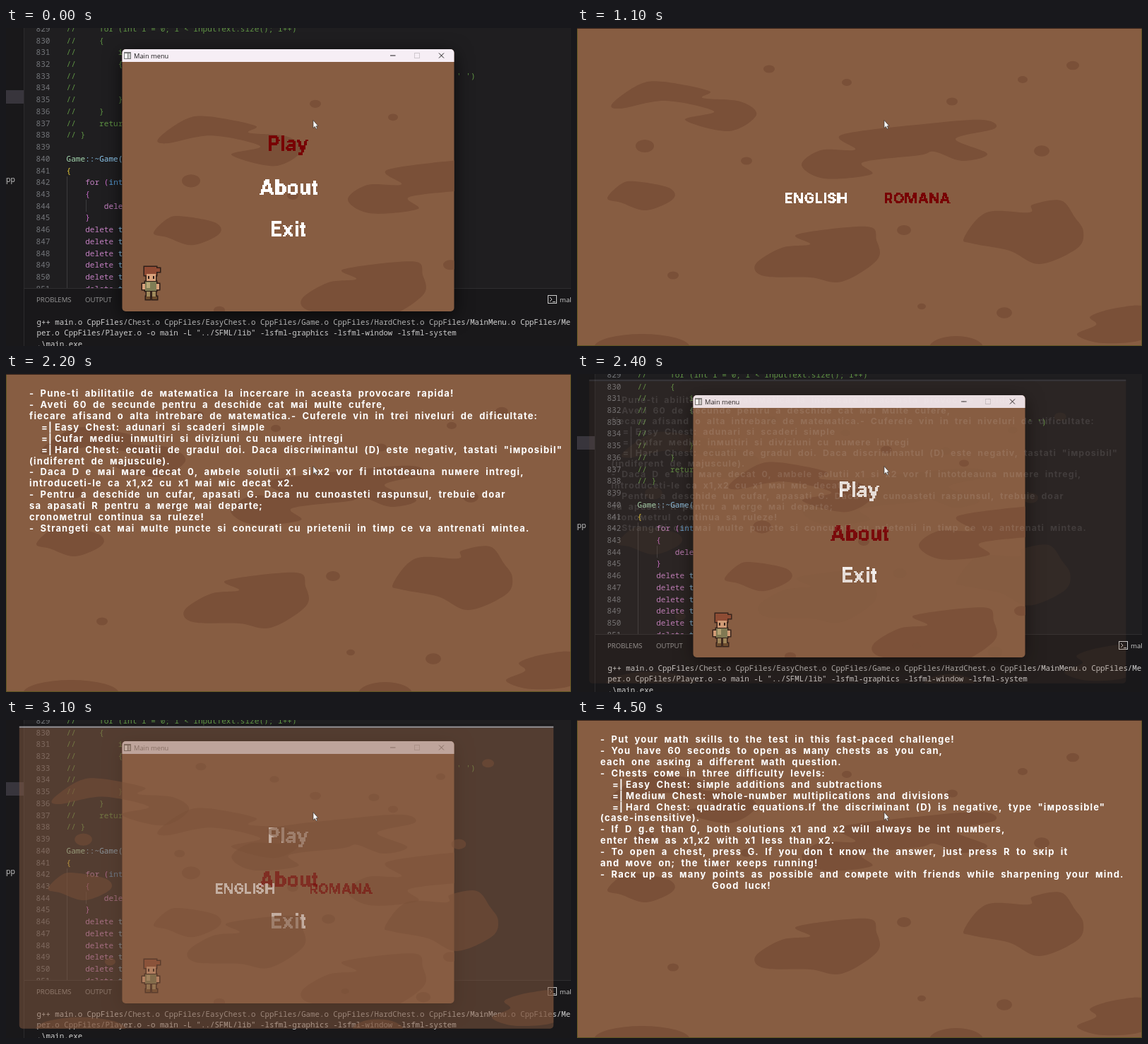
Recreate the animation shown at these times as an HTML page with a canvas. Size 800 px wide and 450 px high, loop 4.6 s.

```html
<!DOCTYPE html>
<html lang="en">
<head>
<meta charset="utf-8">
<title>Main menu</title>
<style>
  html, body { margin: 0; width: 100%; height: 100%; overflow: hidden; background: #1f1e20; }
  canvas { display: block; }
</style>
</head>
<body>
<canvas id="stage" width="800" height="450"></canvas>
<script>
const LOOP = 4600, STEP = 100;
const SOIL = '#875d42', PATCH = '#7a5038', RED = '#780004', WHITE = '#fff';
const MONO = '"Noto Sans Mono", "DejaVu Sans Mono", monospace';
const SANS = '"Open Sans", "Noto Sans", sans-serif';
const ctx = document.getElementById('stage').getContext('2d');

// ---- ground: smooth patches through a few key points, and pebbles ----

const ground = new Path2D();

// Closed Catmull-Rom curve through the given points.
function addPatch(text) {
  const pts = text.split(' ').map(p => p.split(',').map(Number));
  const at = i => pts[(i + pts.length) % pts.length];
  const handle = (p, a, b) => p.map((v, k) => v + (b[k] - a[k]) / 6);
  ground.moveTo(...pts[0]);
  pts.forEach((p, i) => {
    const next = at(i + 1);
    ground.bezierCurveTo(...handle(p, at(i - 1), next), ...handle(next, at(i + 2), p), ...next);
  });
  ground.closePath();
}

function addPebble(x, y, r, squash = 0.7) {
  ground.moveTo(x + r, y);
  ground.ellipse(x, y, r, r * squash, 0, 0, 2 * Math.PI);
}

[
  '50,107 88,80 122,76 187,89 178,99 231,104 254,123 215,146 153,130 194,118 125,103 62,114',
  '375,151 500,135 575,130 592,142 536,157 581,178 545,188 506,175 485,180 405,190 417,207 350,213 318,194 345,173 394,172',
  '43,241 62,221 82,217 130,226 136,242 98,258 62,247',
  '253,334 290,311 330,306 312,292 410,281 424,300 425,328 375,359 330,353 265,351',
  '548,297 580,261 640,261 645,250 685,244 705,268 717,288 708,312 655,334 612,315 560,305',
  '708,434 735,420 727,408 765,396 806,396 806,438 745,446',
].forEach(addPatch);
[
  [272, 58, 8], [382, 77, 7], [531, 104, 8], [631, 73, 7], [702, 53, 9], [658, 174, 11],
  [240, 188, 8], [96, 167, 13], [463, 286, 10], [136, 350, 8], [488, 394, 6], [605, 403, 11],
].forEach(p => addPebble(...p));
addPebble(92, 452, 68, 0.28);
addPebble(537, 452, 38, 0.42);

// ---- texts ----

const romanian = [
  '- Pune-ti abilitatile de matematica la incercare in aceasta provocare rapida!',
  '- Aveti 60 de secunde pentru a deschide cat mai multe cufere,',
  'fiecare afisand o alta intrebare de matematica.- Cuferele vin in trei niveluri de dificultate:',
  '=| Easy Chest: adunari si scaderi simple',
  '=| Cufar mediu: inmultiri si diviziuni cu numere intregi',
  '=| Hard Chest: ecuatii de gradul doi. Daca discriminantul (D) este negativ, tastati "imposibil"',
  '(indiferent de majuscule).',
  '- Daca D e mai mare decat 0, ambele solutii x1 si x2 vor fi intotdeauna numere intregi,',
  'introduceti-le ca x1,x2 cu x1 mai mic decat x2.',
  '- Pentru a deschide un cufar, apasati G. Daca nu cunoasteti raspunsul, trebuie doar',
  'sa apasati R pentru a merge mai departe;',
  'cronometrul continua sa ruleze!',
  '- Strangeti cat mai multe puncte si concurati cu prietenii in timp ce va antrenati mintea.',
];
const english = [
  '- Put your math skills to the test in this fast-paced challenge!',
  '- You have 60 seconds to open as many chests as you can,',
  'each one asking a different math question.',
  '- Chests come in three difficulty levels:',
  '=| Easy Chest: simple additions and subtractions',
  '=| Medium Chest: whole-number multiplications and divisions',
  '=| Hard Chest: quadratic equations.If the discriminant (D) is negative, type "impossible"',
  '(case-insensitive).',
  '- If D g.e than 0, both solutions x1 and x2 will always be int numbers,',
  'enter them as x1,x2 with x1 less than x2.',
  '- To open a chest, press G. If you don t know the answer, just press R to skip it',
  'and move on; the timer keeps running!',
  '- Rack up as many points as possible and compete with friends while sharpening your mind.',
  'Good luck!',
];

const FIRST_ROW = 829;
const code = [
  '//     for (int i = 0; i < inputText.size(); i++)',
  '//     {',
  '//         if (inputText',
  '//         {',
  '//'.padEnd(83) + "' ')",
  '//',
  '//         }',
  '//     }',
  '//     return',
  '// }',
  '',
  'Game::~Game(',
  '{',
  '    for (int',
  '    {',
  '        delete',
  '    }',
  ...Array(6).fill('    delete t'),
];
// Colours in the order of the groups of the token pattern.
const token = /(\/\/.*)|(for|delete)|(int)|(~\w+)|(Game)|([{}(])|(\S+)/g;
const tokenColors = ['#5f9444', '#c27fc0', '#569cd6', '#dcdcaa', '#a5d8b0', '#c76cc8', '#8cc8ee'];

const terminal = [
  'g++ main.o CppFiles/Chest.o CppFiles/EasyChest.o CppFiles/Game.o CppFiles/HardChest.o CppFiles/MainMenu.o CppFiles/Me',
  'per.o CppFiles/Player.o -o main -L "../SFML/lib" -lsfml-graphics -lsfml-window -lsfml-system',
  '.\\main.exe',
];

// ---- drawing helpers ----

function rect(color, x, y, w, h) {
  ctx.fillStyle = color;
  ctx.fillRect(x, y, w, h);
}

function frame(color, x, y, w, h) {
  ctx.strokeStyle = color;
  ctx.lineWidth = 1;
  ctx.strokeRect(x, y, w, h);
}

function stroke(color, path) {
  ctx.strokeStyle = color;
  ctx.lineWidth = 1;
  ctx.stroke(new Path2D(path));
}

function label(text, x, y, font, color, align = 'left') {
  ctx.font = font;
  ctx.fillStyle = color;
  ctx.textAlign = align;
  ctx.fillText(text, x, y);
}

// Text set small without soft edges, then enlarged into square blocks.
const textCache = {};
function pixelText(text, x, base, size, block, color) {
  const w = 80, h = 24, foot = 18;
  const make = () => {
    const c = document.createElement('canvas');
    c.width = w;
    c.height = h;
    const g = c.getContext('2d');
    g.font = `700 ${size / block}px Inter, sans-serif`;
    g.fillStyle = color;
    g.fillText(text, 1, foot);
    const img = g.getImageData(0, 0, w, h);
    for (let i = 3; i < img.data.length; i += 4) img.data[i] = img.data[i] > 105 ? 255 : 0;
    g.putImageData(img, 0, 0);
    return c;
  };
  const c = textCache[text + color] ??= make();
  ctx.imageSmoothingEnabled = false;
  ctx.drawImage(c, x - block, base - foot * block, w * block, h * block);
}

// ---- scenes ----

function drawCode() {
  const font = `11.1px ${MONO}`;
  stroke('#3c3c3e', 'M86.5 210V368M113.5 243V260');
  code.forEach((text, i) => {
    const y = 4.8 + i * 16.73;
    label(FIRST_ROW + i, 62.5, y, font, '#74767a', 'right');
    for (const m of text.matchAll(token)) {
      const kind = m.slice(1).findIndex(Boolean);
      const outerBracket = kind === 5 && text[0] !== ' ';
      label(m[0], 85.5 + m.index * 6.67, y, font, outerBracket ? '#e8cc3a' : tokenColors[kind]);
    }
  });
}

function drawEditor() {
  const small = `9.6px ${SANS}`;
  rect('#1f1e20', 0, 0, 800, 450);
  rect('#19181a', 0, 0, 25, 450);
  rect('#38353c', 0, 88, 25, 19);
  rect('#2b2a2c', 25, 0, 1, 450);
  label('pp', 0, 218, `10.5px ${SANS}`, '#cfcfcf');
  drawCode();

  rect('#19181a', 26, 368, 774, 82);
  rect('#2f2e30', 26, 368, 774, 1);
  label('PROBLEMS', 43, 388, small, '#9a9a9a');
  label('OUTPUT', 112, 388, small, '#9a9a9a');
  label('make', 784, 388, small, '#cccccc');
  frame('#cccccc', 767.5, 378.5, 12, 11);
  stroke('#cccccc', 'M770 381L773 384L770 387M774 387.5H778');
  terminal.forEach((text, i) => label(text, 43.5, 419.5 + i * 15.5, `10.77px ${MONO}`, '#cfcfcf'));
}

function drawHero() {
  const hair = '#8f4a33', skin = '#d9a27c', leather = '#6a4a2c', cloth = '#a08a5c';
  const parts = [
    [skin, 193, 362, 24, 8], ['#7f7d55', 197, 359, 16, 13], ['#b9a878', 199, 360, 5, 8],
    [cloth, 199, 373, 5, 7], [cloth, 207, 373, 5, 7],
    [leather, 198, 380, 6, 4], [leather, 207, 380, 7, 4],
    [hair, 196, 338, 17, 12], [hair, 211, 340, 7, 5], [skin, 199, 348, 13, 10],
  ];
  for (const [, x, y, w, h] of parts) rect('#2e1e18', x - 1.5, y - 1.5, w + 3, h + 3);
  for (const part of parts) rect(...part);
  for (const x of [201, 208]) rect('#2e1e18', x, 351, 2, 4);
}

function drawTitleBar(active) {
  const ink = active ? '#1c1a1c' : '#858085';
  rect('#f6eef5', 164, 30, 471, 18);
  rect('#777', 167, 34, 10, 10);
  rect('#fff', 168, 36, 4, 7);
  rect('#ccc', 173, 36, 3, 7);
  label('Main menu', 181, 42.5, `9.3px ${SANS}`, ink);
  stroke(ink, 'M544 39H551.5M613 35.5L620 42.5M620 35.5L613 42.5');
  frame('#cfc8ce', 578.5, 35.5, 7, 7);
}

function drawMenu(choice, active) {
  ctx.save();
  ctx.beginPath();
  ctx.roundRect(164.5, 30, 470, 371, 5);
  ctx.shadowColor = 'rgba(0,0,0,.65)';
  ctx.shadowBlur = 26;
  ctx.shadowOffsetY = 6;
  ctx.fillStyle = SOIL;
  ctx.fill();
  ctx.shadowColor = 'transparent';
  ctx.clip();
  ctx.translate(166, 49.3);
  ctx.fillStyle = PATCH;
  ctx.fill(ground);
  ctx.translate(-166, -49.3);
  drawTitleBar(active);
  [['Play', 370, 174], ['About', 359, 236], ['Exit', 374, 295]].forEach(([text, x, y], i) =>
    pixelText(text, x, y, 28, 2, i === choice ? RED : WHITE));
  ctx.translate(0, choice);
  drawHero();
  ctx.restore();
}

function drawHelp(lines) {
  const font = '700 13px Inter, sans-serif';
  ctx.letterSpacing = '1.15px';
  ctx.wordSpacing = '4.1px';
  lines.forEach((text, i) => {
    const y = 32.3 + i * 15.87;
    // The lettering gives m and k the form of small capitals.
    const shown = text.replaceAll('m', 'м').replaceAll('k', 'к');
    if (text.startsWith('=|')) {
      label('=|', 50, y, font, WHITE);
      label(shown.slice(3), 69, y, font, WHITE);
    } else {
      label(shown, text.startsWith('Good') ? 191 : 33, y, font, WHITE);
    }
  });
  ctx.letterSpacing = ctx.wordSpacing = '0px';
}

// The large window; scale and alpha follow its opening and closing.
function drawAbout({ scale, alpha }, content) {
  const moving = scale < 1;
  ctx.save();
  ctx.globalAlpha = alpha;
  ctx.translate(345 * (1 - scale), 205 * (1 - scale));
  ctx.scale(scale, scale);
  if (moving) {
    rect('#161516', 0, -6, 800, 4);
    rect('#f3eef2', 0, -2.5, 800, 2.5);
  }
  ctx.beginPath();
  ctx.roundRect(0, 0, 800, 450, moving ? [0, 0, 5, 5] : 0);
  ctx.fillStyle = SOIL;
  ctx.fill();
  ctx.clip();
  ctx.fillStyle = PATCH;
  ctx.fill(ground);
  if (!moving) {
    frame('#5c5422', 0.5, 0.5, 799, 449);
    rect('#38231b', 0, 0, 800, 1);
  }
  if (Array.isArray(content)) drawHelp(content);
  else {
    pixelText('ENGLISH', 293, 248, 20.5, 1.5, content === 'en' ? RED : WHITE);
    pixelText('ROMANA', 434, 248, 20.5, 1.5, content === 'ro' ? RED : WHITE);
  }
  ctx.restore();
}

const pointer = new Path2D('M435 130.5V141.5L437.4 139.3L439 143L440.6 142.2L439.1 138.7H442Z');
function drawPointer() {
  ctx.fillStyle = WHITE;
  ctx.fill(pointer);
  ctx.strokeStyle = '#222';
  ctx.lineWidth = 0.6;
  ctx.stroke(pointer);
}

// ---- timing ----

function opening(t, start) {
  const p = Math.min(1, (t - start) / 300);
  return { scale: 1 - 0.1 * (1 - p) ** 1.5, alpha: Math.min(1, p * 1.5) };
}

function closing(t, start) {
  const p = Math.min(1, (t - start) / 225);
  return { scale: 1 - 0.056 * p, alpha: 1 - p };
}

function aboutContent(t) {
  if (t < 900) return 'en';
  if (t < 1300) return 'ro';
  if (t < 2500) return romanian;
  if (t < 3800) return 'ro';
  return t < 4100 ? 'en' : english;
}

function draw(now) {
  const t = Math.floor(now % LOOP / STEP) * STEP;
  const active = t < 200 || (t >= 2200 && t < 2800);
  drawEditor();
  drawMenu(t < 100 ? 0 : 1, active);
  if (t > 300 && t < 2500) drawAbout(t > 2200 ? closing(t, 2200) : opening(t, 300), aboutContent(t));
  if (t > 3000) drawAbout(opening(t, 3000), aboutContent(t));
  drawPointer();
}

const start = performance.now();
function tick() {
  draw(performance.now() - start);
  requestAnimationFrame(tick);
}
tick();
</script>
</body>
</html>
```
